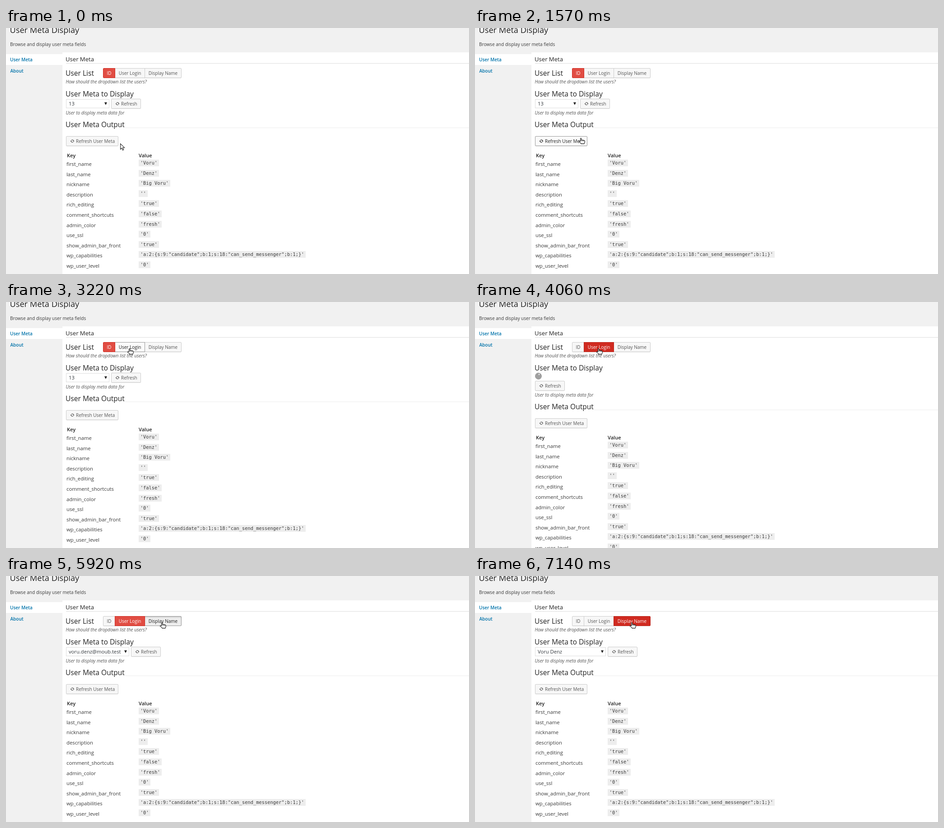
Animation, 1026 px wide and 546 px high, one loop 7.57 s. Source, as an HTML page:

```html
<!DOCTYPE html>
<html lang="en">
<head>
<meta charset="utf-8">
<title>User Meta Display</title>
<style>
  html, body { margin: 0; width: 100%; height: 100%; overflow: hidden; background: #f1f1f1; }
  body { position: relative; font: 10px "Open Sans", sans-serif; color: #3a3a3a; }
  div, span, svg, i { position: absolute; box-sizing: border-box; }
  #stage { left: 0; top: 0; width: 1026px; height: 546px; overflow: hidden; }
  #panel { left: 125px; top: 54px; width: 901px; height: 492px; background: #fff; }
  #tab { left: 0; top: 58px; width: 125px; height: 24px; background: #fff; }
  #lower, #table { left: 0; top: 0; }
  .line { height: 1px; right: 0; }
  .t { height: 20px; line-height: 20px; white-space: pre; }
  .title { font-size: 18.2px; color: #222; }
  .intro { font-size: 10.05px; }
  .sub { font-size: 13.1px; color: #222; }
  .head { font-size: 15.6px; color: #222; }
  .nav { font-weight: 600; color: #0073aa; }
  .hint { font-size: 10.1px; font-style: italic; color: #555; }
  .key { font-size: 11.3px; }
  .th { font-size: 11.1px; font-weight: 600; color: #222; }
  .code {
    height: 15px; padding: 0 3.8px; white-space: pre;
    font: 10.4px/15px "DejaVu Sans Mono", monospace; background: #ededed;
  }
  .btn {
    height: 22px; line-height: 20px; border: 1px solid #ccc; background: #f7f7f7; color: #555;
    text-align: center; white-space: nowrap; box-shadow: 0 1px 0 rgba(0, 0, 0, .06);
  }
  .first { border-radius: 2px 0 0 2px; }
  .last { border-radius: 0 2px 2px 0; }
  .icon { text-align: left; padding-left: 21px; border-radius: 2px; }
  .icon svg { left: 8px; top: 5px; }
  .hover { background: #fafafa; border-color: #999; color: #222; z-index: 1; }
  .press { background: #eee; box-shadow: inset 0 2px 5px -3px rgba(0, 0, 0, .5); }
  .on { background: #e14d43; border-color: #d02a21; color: #fff; z-index: 2; }
  .on.hover { background: #d02a20; border-color: #ba281e; }
  #select {
    left: 133px; top: 158px; height: 20px; line-height: 18px; padding-left: 5px;
    border: 1px solid #ddd; background: #fff; color: #32373c; font-size: 11.2px; white-space: nowrap;
  }
  #select b { font-weight: 400; }
  #select i {
    right: 4px; top: 6px; border: solid transparent; border-width: 6px 3px 0; border-top-color: #222;
  }
  .spinner { width: 15px; height: 15px; border-radius: 50%; background: #a0a0a0; }
  .spinner i { left: 6.5px; top: 2px; width: 2px; height: 3px; border-radius: 1px; background: #fff; }
  #spinSelect { left: 133px; top: 157px; }
  #spinTable { left: 126px; top: 274px; }
  #arrow, #hand { left: 0; top: 0; z-index: 5; overflow: visible; }
</style>
</head>
<body>
<div id="stage">
  <div id="panel"></div>
  <div id="tab"></div>
  <div id="lower" style="width:1026px;height:600px"><div id="table"></div></div>
  <div id="select"><b></b><i></i></div>
  <div class="spinner" id="spinSelect"><i></i></div>
  <div class="spinner" id="spinTable"><i></i></div>
  <svg id="arrow" width="12" height="18" fill="#fff" stroke="#222" stroke-width="1.1">
    <path d="M.6 .8V13.2L3.5 10.5 5.6 15.3 7.8 14.3 5.7 9.7H9.6Z"/>
  </svg>
  <svg id="hand" width="15" height="15" fill="#fff" stroke="#111" stroke-width="1.1" stroke-linejoin="round">
    <path d="M3.6 7.6V1.6Q3.7.5 4.7.5 5.7.5 5.8 1.6V4.7Q7.4 4.1 8.2 5 9.6 4.5 10.5 5.4 12.7 5.2 13.2 6.8V9.3L12 12.9H5.2Q4.2 10.8 1 8.9 0 8 1 7.3 2.2 6.8 3.6 7.6Z"/>
    <path d="M5.9 4.7V7.4M8.3 5V7.4M10.6 5.4V7.4" fill="none" stroke-width=".8"/>
  </svg>
</div>
<script>
const LOOP = 7570;
const $ = id => document.getElementById(id);
const stage = $('stage'), lower = $('lower'), table = $('table'), select = $('select');

function add(parent, cls, x, y, text) {
  const el = document.createElement('span');
  el.className = cls;
  el.style.left = x + 'px';
  el.style.top = y + 'px';
  el.textContent = text;
  parent.appendChild(el);
  return el;
}

// y is the vertical middle of the line
const label = (parent, cls, x, y, text) => add(parent, 't ' + cls, x, y - 10, text);

function line(parent, x, y, color) {
  add(parent, 'line', x, y, '').style.background = color;
}

function button(parent, x, y, w, text, cls) {
  const el = add(parent, 'btn ' + cls, x, y, text);
  el.style.width = w + 'px';
  if (cls === 'icon') {
    el.insertAdjacentHTML('beforeend',
      '<svg width="10" height="10" fill="none" stroke="currentColor" stroke-width="1.2">' +
      '<path d="M2.9 3.2A2.9 2.9 0 0 1 7.9 4.8M7.1 6.8A2.9 2.9 0 0 1 2.1 5.2"/>' +
      '<path d="M6.2 4.6H9.6L7.9 6.6ZM.4 5.4H3.8L2.1 3.4Z" fill="currentColor" stroke="none"/></svg>');
  }
  return el;
}

label(stage, 'title', 8.5, 3.5, 'User Meta Display');
label(stage, 'intro', 9, 36, 'Browse and display user meta fields');
label(stage, 'nav', 9, 70, 'User Meta');
label(stage, 'nav', 9.5, 95, 'About');
label(stage, 'sub', 132, 69, 'User Meta');
line(stage, 133, 78, '#ddd');
label(stage, 'head', 132, 100, 'User List');
label(stage, 'hint', 132.5, 119, 'How should the dropdown list the users?');
label(stage, 'head', 132, 146, 'User Meta to Display');
label(lower, 'hint', 132.5, 188, 'User to display meta data for');
label(lower, 'head', 132, 214, 'User Meta Output');
line(lower, 264, 221, '#eee');

const buttons = {
  id: button(stage, 215, 89, 27, 'ID', 'first'),
  login: button(stage, 241, 89, 67, 'User Login', ''),
  name: button(stage, 307, 89, 82, 'Display Name', 'last'),
  refresh: button(stage, 233, 157, 66, 'Refresh', 'icon'),
  meta: button(lower, 133, 240, 116, 'Refresh User Meta', 'icon')
};

const fields = {
  first_name: 'Voru',
  last_name: 'Denz',
  nickname: 'Big Voru',
  description: '',
  rich_editing: 'true',
  comment_shortcuts: 'false',
  admin_color: 'fresh',
  use_ssl: '0',
  show_admin_bar_front: 'true',
  wp_capabilities: 'a:2:{s:9:"candidate";b:1;s:18:"can_send_messenger";b:1;}',
  wp_user_level: '0'
};
label(table, 'th', 135, 283, 'Key');
label(table, 'th', 294, 283, 'Value');
Object.entries(fields).forEach(([key, value], i) => {
  const y = i * 22.6;
  label(table, 'key', 134, 302 + y, key);
  add(table, 'code', 294, 292 + y, `'${value}'`);
});

// [time, x, y] of the pointer tip
const path = [
  [20, 253, 256], [250, 229, 253],
  [1450, 229, 253], [1570, 234, 244.5], [1960, 272, 162],
  [2650, 272, 162], [2910, 274, 111], [3220, 273, 103],
  [5060, 273, 103], [5400, 306, 105], [5820, 345, 103],
  [7080, 345, 103], [7140, 347, 103]
];
const hovers = [
  [0, ''], [130, 'meta'], [1610, ''], [1870, 'refresh'],
  [2700, ''], [2930, 'login'], [5410, 'name']
];
const modes = [[0, 'id'], [3980, 'login'], [5970, 'name']];
// [time, text, select width]
const choices = [[0, '13', 96], [4810, 'voru.denz@moub.test', 140], [6770, 'Voru Denz', 157]];
const clicks = [480, 2160, 3930, 5920];
const selectLoads = [[2210, 3010], [3980, 4810], [5970, 6770]];
const tableLoads = [[530, 1330]];

const latest = (list, t) => list.filter(e => e[0] <= t).pop();
const during = (spans, t) => spans.find(([from, to]) => t >= from && t < to);

function pointer(t) {
  const n = path.findIndex(p => p[0] > t);
  if (n === 0) return path[0].slice(1);
  if (n < 0) return path[path.length - 1].slice(1);
  const [t0, x0, y0] = path[n - 1], [t1, x1, y1] = path[n];
  const k = (t - t0) / (t1 - t0);
  return [x0 + (x1 - x0) * k, y0 + (y1 - y0) * k];
}

const show = (el, on) => { el.style.visibility = on ? 'visible' : 'hidden'; };

function spin(el, load, t) {
  show(el, load);
  if (load) el.style.transform = `rotate(${(t - load[0] - 50) * 0.45}deg)`;
}

function render(t) {
  const [x, y] = pointer(t).map(Math.round);
  const hover = latest(hovers, t)[1];
  const mode = latest(modes, t)[1];
  const pressed = clicks.some(c => t >= c && t < c + 50);
  const [, text, width] = latest(choices, t);
  const loading = during(selectLoads, t), tableLoading = during(tableLoads, t);

  for (const [name, el] of Object.entries(buttons)) {
    el.classList.toggle('hover', name === hover);
    el.classList.toggle('press', name === hover && pressed);
    el.classList.toggle('on', name === mode);
  }

  select.firstChild.textContent = text;
  select.style.width = width + 'px';
  show(select, !loading);
  buttons.refresh.style.left = (loading ? 133 : 137 + width) + 'px';
  buttons.refresh.style.top = (loading ? 175 : 157) + 'px';
  lower.style.top = (loading ? 18 : 0) + 'px';
  show(table, !tableLoading);
  spin($('spinSelect'), loading, t);
  spin($('spinTable'), tableLoading, t);

  show($('arrow'), !hover);
  show($('hand'), hover);
  $('arrow').style.transform = `translate(${x}px, ${y}px)`;
  $('hand').style.transform = `translate(${x - 4}px, ${y}px)`;
}

const start = performance.now();
function tick() {
  render((performance.now() - start) % LOOP);
  requestAnimationFrame(tick);
}
tick();
</script>
</body>
</html>
```
